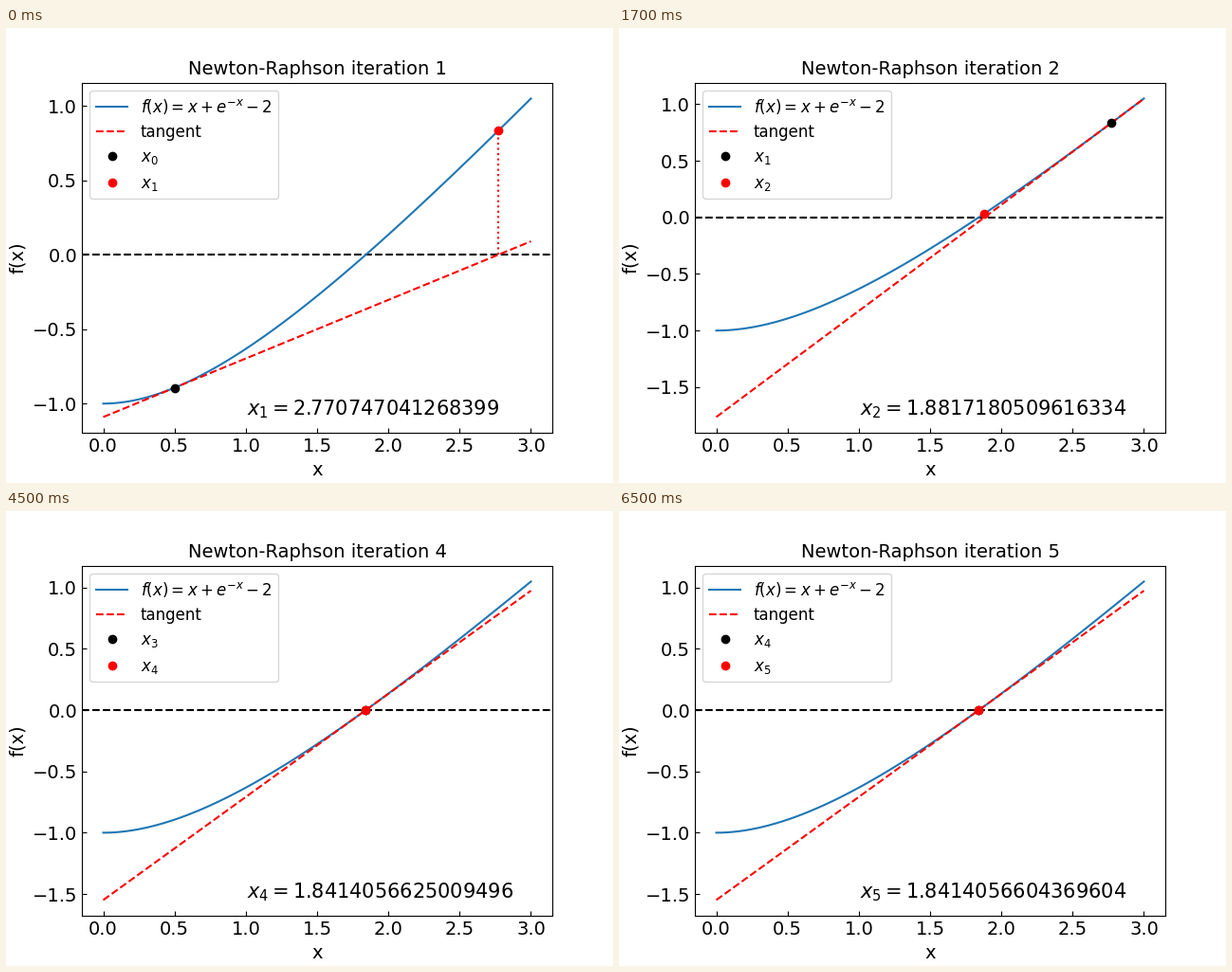
A matplotlib script for the animation above (8000 ms loop, 640 by 480 pixels).

```python
import numpy as np
import matplotlib.pyplot as plt
from matplotlib.animation import FuncAnimation

plt.rcParams.update({
    "font.family": "DejaVu Sans",
    "font.size": 14,
    "axes.titlesize": 14,
    "legend.fontsize": 12,
    "xtick.direction": "in",
    "ytick.direction": "in",
})

INTERVAL = 500   # ms
FRAMES = 16
HOLD = 4         # frames per iteration; the first one lasts a single frame

# Newton iterates of f, starting from 0.5
ITERATES = [0.5, 2.770747041268399, 1.8817180509616334,
            1.8415536581656031, 1.8414056625009496, 1.8414056604369604]


def f(x):
    return x + np.exp(-x) - 2


def slope(x):
    return 1 - np.exp(-x)


fig, ax = plt.subplots(figsize=(6.4, 4.8), dpi=100)
xs = np.linspace(0, 3, 100)


def draw(frame):
    n = (frame + HOLD - 1) // HOLD
    old, new = ITERATES[n], ITERATES[n + 1]

    ax.clear()
    ax.axhline(0, color="black", linestyle="--")
    ax.plot(xs, f(xs), color="tab:blue", label="$f(x)=x+e^{-x}-2$")
    ax.plot(xs, f(old) + slope(old) * (xs - old), "r--", label="tangent")
    ax.plot([new, new], [0, f(new)], "r:")
    ax.plot(old, f(old), "ko", label=f"$x_{n}$")
    ax.plot(new, f(new), "ro", label=f"$x_{n + 1}$")

    ax.text(0.35, 0.05, f"$x_{n + 1}={new}$", fontsize=15,
            transform=ax.transAxes)
    ax.set_title(f"Newton-Raphson iteration {n + 1}")
    ax.set_xlabel("x")
    ax.set_ylabel("f(x)")
    ax.legend(loc="upper left")


anim = FuncAnimation(fig, draw, frames=FRAMES, interval=INTERVAL,
                     repeat=True, repeat_delay=0)
plt.show()
```
